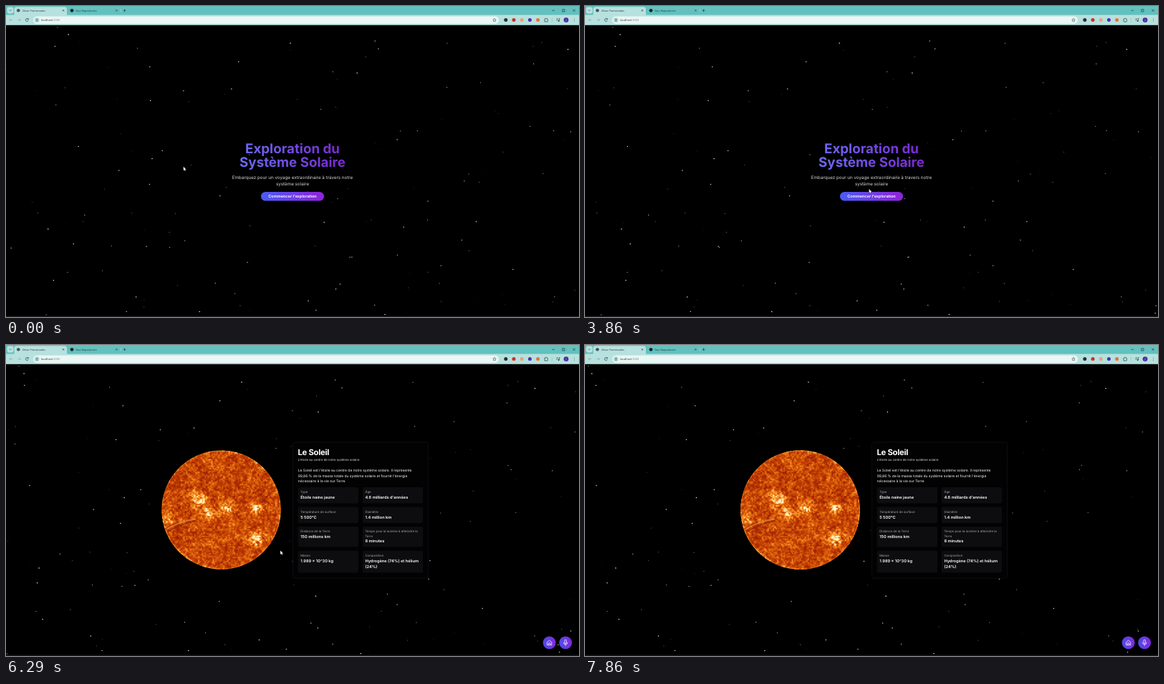
An HTML page with a canvas that plays this animation: 800 by 435 pixels, repeating every 8000 ms.

```html
<!DOCTYPE html>
<html lang="fr">
<head>
<meta charset="utf-8">
<title>Exploration du Système Solaire</title>
<style>
html, body { margin: 0; width: 100%; height: 100%; overflow: hidden; background: #000; }
canvas { display: block; width: 800px; height: 435px; }
</style>
</head>
<body>
<canvas id="stage" width="800" height="435"></canvas>
<script>
const ctx = document.getElementById('stage').getContext('2d');
const LOOP = 8000, STEPS = 56, STEP = LOOP / STEPS;
const SLIDE_START = 5416, SLIDE_LENGTH = 700;
const INTER = 'Inter, sans-serif', UI = '"Open Sans", sans-serif';
const INK = '#203433';

function seeded(seed) {
  return () => {
    seed = (seed * 1664525 + 1013904223) >>> 0;
    return seed / 4294967296;
  };
}
const clamp = (v, lo = 0, hi = 1) => Math.min(hi, Math.max(lo, v));
const mix = (a, b, k) => a + (b - a) * k;
const ease = u => u * u * (3 - 2 * u);

// ---------- drawing helpers ----------
function box(x, y, w, h, r, fill, stroke) {
  ctx.beginPath();
  ctx.roundRect(x, y, w, h, r);
  ctx.fillStyle = fill;
  ctx.fill();
  if (stroke) {
    ctx.strokeStyle = stroke;
    ctx.lineWidth = 0.6;
    ctx.stroke();
  }
}
function disc(x, y, r, fill) {
  ctx.beginPath();
  ctx.arc(x, y, r, 0, Math.PI * 2);
  ctx.fillStyle = fill;
  ctx.fill();
}
function line(path, color = INK, width = 0.65) {
  ctx.strokeStyle = color;
  ctx.lineWidth = width;
  ctx.stroke(new Path2D(path));
}
function cross(x, y, r) {
  line(`M${x - r} ${y - r}l${2 * r} ${2 * r}m0 ${-2 * r}l${-2 * r} ${2 * r}`);
}
function text(str, x, y, size, color, { weight = 400, align = 'left', family = INTER, spacing = 0 } = {}) {
  ctx.font = `${weight} ${size}px ${family}`;
  ctx.letterSpacing = spacing + 'px';
  ctx.textAlign = align;
  ctx.fillStyle = color;
  ctx.fillText(str, x, y);
}
function lines(str, x, y, leading, ...style) {
  const parts = str.split('\n');
  parts.forEach((s, i) => text(s, x, y + i * leading, ...style));
  return y + parts.length * leading;
}
function fade(x0, x1, from, to) {
  const g = ctx.createLinearGradient(x0, 0, x1, 0);
  g.addColorStop(0, from);
  g.addColorStop(1, to);
  return g;
}

// ---------- stars drifting left, each at its own speed ----------
const rand = seeded(77);
const stars = Array.from({ length: 150 }, () => {
  const speed = mix(2, 11, rand()), glow = rand();
  return {
    x: rand() * (800 + speed * LOOP / 1000),
    y: mix(28, 432, rand()),
    speed,
    r: mix(0.4, 0.75, glow),
    alpha: mix(0.25, 1, glow)
  };
});
function drawStars(t) {
  for (const s of stars) {
    ctx.globalAlpha = s.alpha;
    disc(s.x - s.speed * t / 1000, s.y, s.r, '#fff');
  }
  ctx.globalAlpha = 1;
}

// ---------- sun ----------
// centre in radii, spread
const flares = [
  [-0.4, -0.18, 0.15], [-0.2, 0.05, 0.1], [0.1, -0.02, 0.14],
  [0.58, -0.03, 0.1], [0.6, 0.5, 0.14], [-0.94, 0.17, 0.12]
];
function heatColor(v) {
  return [140 + 150 * v, 34 + 215 * v ** 1.9, 3 + 215 * v ** 5];
}
function makeNoise() {
  const grid = Float32Array.from({ length: 4096 }, seeded(5));
  const at = (x, y) => grid[(y & 63) * 64 + (x & 63)];
  return (x, y) => {
    const i = Math.floor(x), j = Math.floor(y), u = ease(x - i), w = ease(y - j);
    return mix(mix(at(i, j), at(i + 1, j), u), mix(at(i, j + 1), at(i + 1, j + 1), u), w);
  };
}
function makeSun(size) {
  const c = document.createElement('canvas');
  c.width = c.height = size;
  const g = c.getContext('2d'), img = g.createImageData(size, size), noise = makeNoise();
  const half = size / 2;
  for (let py = 0; py < size; py++) {
    for (let px = 0; px < size; px++) {
      const x = (px + 0.5 - half) / half, y = (py + 0.5 - half) / half, d = Math.hypot(x, y);
      if (d > 1) continue;
      const layer = f => noise((x + 2) * f, (y + 2) * f);
      const n = 0.2 * layer(7) + 0.35 * layer(24) + 0.45 * layer(45);
      let heat = 0.39 + (n - 0.5) * 0.95 + 0.25 * clamp((d - 0.97) / 0.03);
      for (const [fx, fy, spread] of flares) {
        heat += 0.7 * (0.15 + n) * Math.exp(-((x - fx) ** 2 + 1.8 * (y - fy) ** 2) / spread ** 2);
      }
      img.data.set([...heatColor(clamp(heat)), 255 * clamp((1 - d) * half)], (py * size + px) * 4);
    }
  }
  g.putImageData(img, 0, 0);
  // filament on the left limb
  g.translate(half, half);
  g.scale(half, half);
  g.lineWidth = 0.02;
  g.strokeStyle = 'rgba(125,36,6,.6)';
  g.stroke(new Path2D('M-.91 .38Q-.7 .24-.42 .18'));
  g.strokeStyle = 'rgba(255,190,95,.5)';
  g.stroke(new Path2D('M-.92 .33Q-.72 .2-.42 .15'));
  return c;
}
const sun = makeSun(346);

function drawSun(t, p) {
  const pulse = 85.1 - 2 * Math.cos(Math.PI * (t - 6100) / 1000);
  const r = mix(77, pulse, p);
  ctx.drawImage(sun, 300.5 - r, 230.6 - r, r * 2, r * 2);
}

// ---------- pages ----------
function drawHome() {
  const title = { weight: 700, align: 'center' }, body = { align: 'center' };
  lines('Exploration du\nSystème Solaire', 400, 206.3, 18.75, 18.75, fade(316, 484, '#6b70f6', '#7a22cf'), title);
  lines('Embarquez pour un voyage extraordinaire à travers notre\nsystème solaire',
    400, 241.8, 8.8, 6.25, '#d6d6da', body);
  box(356, 260, 88, 12.6, 6.3, fade(356, 444, '#4a5cf2', '#9023da'));
  text("Commencer l'exploration", 400, 268.3, 5.55, '#fff', { weight: 600, align: 'center' });
}

const facts = [
  [['Type', 'Étoile naine jaune'], ['Âge', "4.6 milliards d'années"]],
  [['Température de surface', '5 500°C'], ['Diamètre', '1.4 million km']],
  [['Distance de la Terre', '150 millions km'], ['Temps pour la lumière à atteindre la\nTerre', '8 minutes']],
  [['Masse', '1.989 × 10^30 kg'], ['Composition', 'Hydrogène (74%) et hélium\n(24%)']]
];
const LABEL_LEADING = 6.2, VALUE_LEADING = 8.5;
const breaks = str => str.split('\n').length - 1;

function drawCard() {
  box(400.5, 135.8, 189, 190.5, 3, '#020203', '#15161c');
  text('Le Soleil', 407.5, 153.6, 11.3, '#fff', { weight: 700, spacing: -0.29 });
  text("L'étoile au centre de notre système solaire", 407.8, 162.4, 4.3, '#e2e2e5');
  lines("Le Soleil est l'étoile au centre de notre système solaire. Il représente\n" +
    "99,86 % de la masse totale du système solaire et fournit l'énergie\n" +
    'nécessaire à la vie sur Terre.', 407.8, 177.1, 7.5, 4.95, '#fff');
  let y = 199;
  for (const row of facts) {
    const extra = row.map(([label, value]) => breaks(label) * LABEL_LEADING + breaks(value) * VALUE_LEADING);
    const h = 22.4 + Math.max(...extra);
    row.forEach(([label, value], i) => {
      const x = 407.6 + i * 90.2;
      box(x, y, 84.4, h, 2, '#0d0c0e');
      const next = lines(label, x + 3.6, y + 8.3, LABEL_LEADING, 4.35, '#a8a8ad');
      lines(value, x + 3.6, next + 1.5, VALUE_LEADING, 5.65, '#fff', { weight: 600 });
    });
    y += h + 5.1;
  }
}
function drawDock() {
  for (const x of [758.6, 781.2]) disc(x, 416.4, 8.9, fade(x - 9, x + 9, '#4f4bea', '#8129dc'));
  line('M755.4 415.8L758.6 413L761.8 415.8V419.6H755.4ZM757.4 419.4V416.9H759.8V419.4', '#fff', 0.75);
  line('M780 413.4a1.2 1.2 0 0 1 2.4 0v3a1.2 1.2 0 0 1-2.4 0ZM778.4 415.8a2.8 3 0 0 0 5.6 0M781.2 418.8V420.8', '#fff', 0.75);
}

// ---------- browser frame ----------
function drawTabs() {
  box(0, 0, 800, 14, 0, '#62c0be');
  box(0, 12.4, 800, 14.3, 0, '#b7e1de');
  box(1.5, 1.5, 9, 9, 3, '#b7e1de');
  line('M4.6 5.4L6 6.8L7.4 5.4');
  box(11.5, 1.3, 73.5, 13, [3.5, 3.5, 0, 0], '#b7e1de');
  disc(17.3, 6.3, 2.3, '#42595a');
  text('Zénar Promenades', 22.8, 7.7, 3.6, INK, { family: UI });
  disc(92, 6.3, 2.4, '#1b2327');
  text('Your Repositories', 97.2, 7.7, 3.6, INK, { family: UI });
  for (const x of [80, 154.4]) cross(x, 6.3, 1.2);
  line('M160.4 4V8.6', '#a9dedb');
  line('M163.8 6.3H167.4M165.6 4.5V8.1');
  line('M762.4 6.3H766M776.8 4.8h3.2v3.2h-3.2Z');
  cross(793, 6.3, 1.6);
}
function drawToolbar() {
  line('M9 19.6H5M6.8 17.8L5 19.6L6.8 21.4M16.4 19.6H20.4M18.6 17.8L20.4 19.6L18.6 21.4', '#86aaa8');
  line('M31 18.4a2 2 0 1 0 .2 1.9M31.3 17.1V18.8H29.6');
  box(38, 14.4, 650, 10.6, 5.3, '#e9f7f5');
  disc(43.2, 19.7, 3.4, '#b9dedb');
  line('M41.6 18.6H44.8M41.6 20.8H44.8');
  text('localhost', 49, 21.2, 3.9, '#23302f', { family: UI });
  text(':3000', 49 + ctx.measureText('localhost').width, 21.2, 3.9, '#8b8271', { family: UI });
  line('M682 17.3l.7 1.5 1.6.2-1.2 1.1.3 1.6-1.4-.8-1.4.8.3-1.6-1.2-1.1 1.6-.2Z', INK, 0.5);

  ['#252f35', '#cf2d22', '#e4a27e', '#4a2fb0', '#ee6d3c']
    .forEach((color, i) => disc(697.8 + i * 11.2, 19.5, 2.5, color));
  line('M752 18h1.3a.8.8 0 0 1 1.6 0h1.2v1.3a.8.8 0 0 1 0 1.5v1.2H752Z');
  line('M762.4 17V22.4', '#7cc6c3');
  line('M768.4 18H771.2M768.4 19.8H770.4M772.4 21V17.6H773.6');
  disc(771.6, 21, 0.9, INK);
  disc(782, 19.6, 3.4, '#4a2d9e');
  text('J', 782, 21, 3.8, '#fff', { align: 'center', family: UI });
  for (const dy of [-1.7, 0, 1.7]) disc(793.4, 19.6 + dy, 0.45, INK);
}

// ---------- pointer: time, x, y ----------
const route = [[0, 247.8, 224.8], [3860, 396.6, 256], [5710, 392.8, 272.3], [6500, 381, 291]];
const pointerShown = t => t < 1800 || (t > 2800 && t < 6500);

function drawPointer(t) {
  if (!pointerShown(t)) return;
  const i = Math.max(1, route.findIndex(stop => stop[0] >= t)), a = route[i - 1], b = route[i];
  const k = ease((t - a[0]) / (b[0] - a[0]));
  const arrow = new Path2D('M0 0V5.2L1.2 4.2L2 6L2.9 5.6L2.1 3.9H3.7Z');
  ctx.save();
  ctx.translate(mix(a[1], b[1], k), mix(a[2], b[2], k));
  ctx.strokeStyle = '#111';
  ctx.lineWidth = 0.8;
  ctx.stroke(arrow);
  ctx.fillStyle = '#fff';
  ctx.fill(arrow);
  ctx.restore();
}

function page(dx, blur, alpha, draw) {
  ctx.save();
  ctx.translate(dx, 0);
  ctx.globalAlpha = alpha;
  if (blur > 0.05) ctx.filter = `blur(${blur}px)`;
  draw();
  ctx.restore();
}

function render(t) {
  const p = ease(clamp((t - SLIDE_START) / SLIDE_LENGTH));
  ctx.fillStyle = '#000';
  ctx.fillRect(0, 0, 800, 435);
  drawStars(t);
  if (p < 1) page(-800 * p, 5 * p, 1 - 0.3 * p, drawHome);
  if (p > 0) {
    page(800 * (1 - p), 3.6 * (1 - p), 1, () => {
      drawSun(t, p);
      drawCard();
    });
    drawDock();
  }
  drawTabs();
  drawToolbar();
  box(0, 433.6, 800, 1.4, 0, '#16181a');
  drawPointer(t);
}

ctx.textRendering = 'geometricPrecision';
function tick() {
  const ms = performance.now() % LOOP;
  const n = Math.min(STEPS - 1, Math.floor((ms + 5) / STEP));
  render(n * STEP);
  requestAnimationFrame(tick);
}
tick();
</script>
</body>
</html>
```
